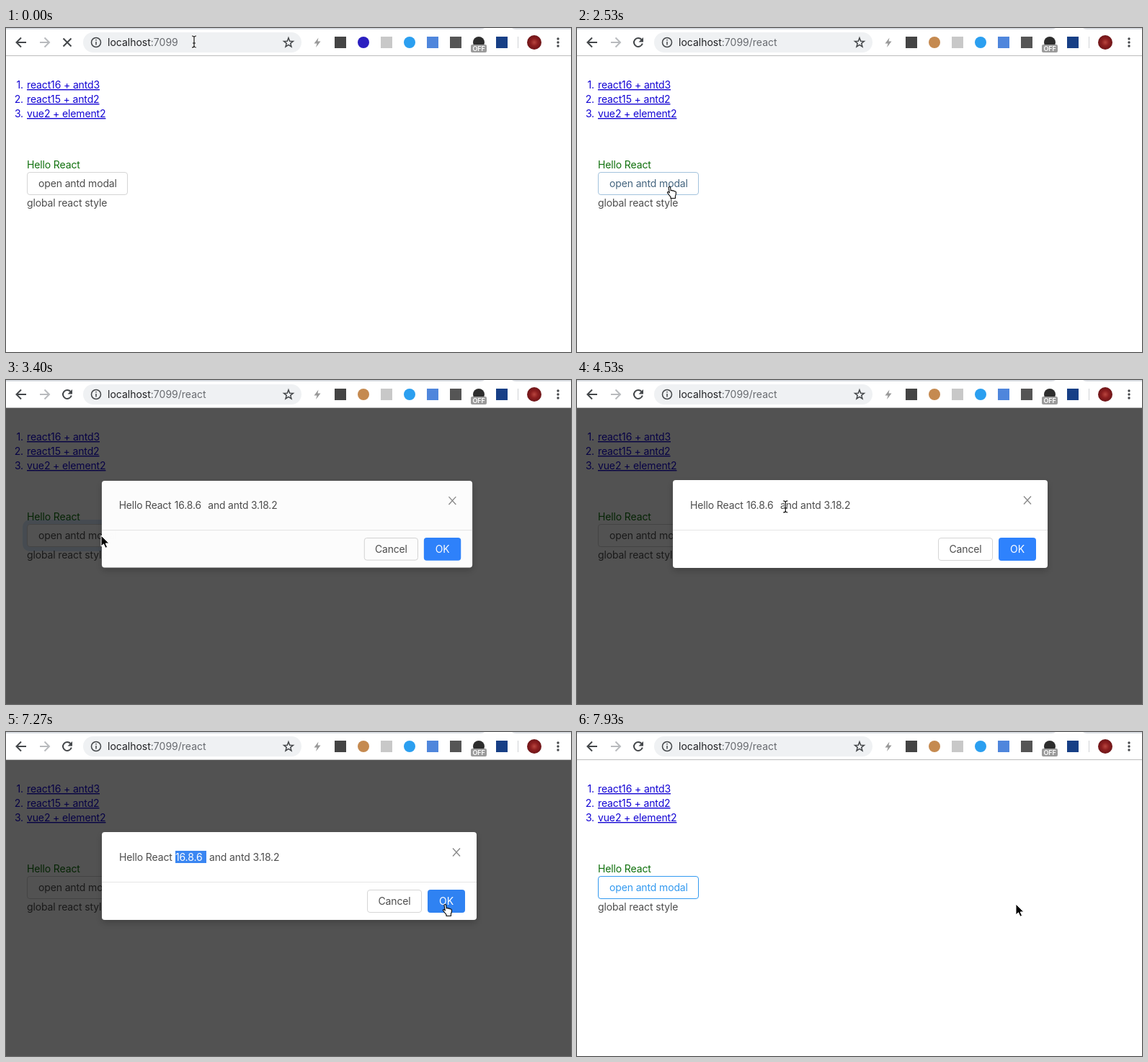
Write an HTML page that moves like this. It is 784 px wide and 450 px high and loops after 8000 ms.

```html
<!DOCTYPE html>
<html lang="en">
<head>
<meta charset="utf-8">
<title>Micro frontend demo</title>
<style>
  html, body { margin: 0; width: 100%; height: 100%; overflow: hidden; background: #fff; }
  svg { display: block; width: 100vw; height: 100vh; }
  text { font: 14px Inter, "Open Sans", sans-serif; letter-spacing: -.01em; fill: #4d4d4d; white-space: pre; }
  .url { letter-spacing: 0; }
  .links text { fill: #1405d4; }
  .links .link { text-decoration: underline; }
  .digits { font-variant-numeric: tabular-nums; }
  .line { fill: none; stroke: #44474a; stroke-width: 2; }
  .thin { stroke-width: 1.5; }
</style>
</head>
<body>
<svg viewBox="0 0 784 450">
  <defs>
    <radialGradient id="avatar">
      <stop offset="0" stop-color="#b8463f"/><stop offset=".5" stop-color="#8e1f20"/><stop offset="1" stop-color="#6d1518"/>
    </radialGradient>
    <filter id="shadow" x="-10%" y="-20%" width="120%" height="150%">
      <feDropShadow dx="0" dy="4" stdDeviation="5" flood-opacity=".2"/>
    </filter>
  </defs>
  <rect width="784" height="450" fill="#fff"/>

  <g id="page">
    <g class="links" id="links"></g>
    <text x="29" y="195" style="fill:#0f700c">Hello React</text>
    <rect id="wave" x="29" y="200" width="140" height="32" rx="4" fill="none" stroke="#3d96f5"/>
    <rect id="button" x="29.5" y="200.5" width="139" height="31" rx="3.5" fill="#fff"/>
    <text id="buttonText" x="45" y="221">open antd modal</text>
    <text x="29" y="248">global react style</text>
  </g>

  <rect id="mask" y="39" width="784" height="411"/>
  <g id="modal">
    <rect x="133" y="139" width="520" height="122" rx="4" fill="#fff" filter="url(#shadow)"/>
    <path d="M133 208.5H653" stroke="#e5e5e5"/>
    <path d="M620 161.500l10 11m0-11l-10 11" class="line" style="stroke:#888;stroke-width:1.3"/>
    <rect id="selection" y="165" height="17" fill="#3a86f2"/>
    <g class="digits">
      <text x="157" y="179">Hello React</text>
      <text x="235" y="179" id="version"></text>
      <text x="282" y="179">and antd 3.18.2</text>
    </g>
    <rect x="501.500" y="219.500" width="75" height="31" rx="3.5" fill="#fff" stroke="#d5d5d5"/>
    <text x="539" y="240" text-anchor="middle">Cancel</text>
    <rect id="ok" x="585" y="219" width="52" height="32" rx="4"/>
    <text x="611" y="240" text-anchor="middle" style="fill:#fff">OK</text>
  </g>

  <g id="toolbar">
    <rect width="784" height="39" fill="#fff"/>
    <path d="M0 0H664Q662 2 658 2H0ZM702 0H784V2H708Q704 2 702 0Z" fill="#d9dce2"/>
    <path d="M0 38.500H784" stroke="#bdbdbd"/>
    <path class="line" d="M28 20H15M21 13.500L14.500 20l6.500 6.500"/>
    <path class="line" style="stroke:#b9bbbe" d="M47 20H60M53.500 13.500L60 20l-6.500 6.500"/>
    <path id="stop" class="line" d="M79.500 14.500l11 11m0-11l-11 11"/>
    <g id="reload">
      <path class="line" d="M89.500 16A6 6 0 1 0 90.800 21.500"/>
      <path d="M92 13v6.500h-6.500Z" fill="#44474a"/>
    </g>
    <rect x="107" y="6" width="303" height="28" rx="14" fill="#eff1f3"/>
    <circle class="line thin" cx="125" cy="20" r="6.500"/>
    <path class="line thin" d="M125 19v4.500M125 16v1.600"/>
    <text class="url" x="141" y="25" style="fill:#202124">localhost<tspan id="path" fill="#686b70"></tspan></text>
    <path id="star" class="line thin"/>
    <path d="M433.500 13.500L427.500 21.500H431.500L430 27 436.500 18.500H432.500Z" fill="#999"/>
    <g id="extensions"></g>
    <rect x="645" y="23" width="22" height="11" rx="2" fill="#9b9b9b"/>
    <text x="656" y="32" text-anchor="middle" style="font-size:9px;font-weight:600;fill:#fff">OFF</text>
    <path d="M710.500 12V28" stroke="#d0d3d6"/>
    <circle cx="733" cy="20" r="10" fill="url(#avatar)"/>
    <path d="M766 15h.01M766 20h.01M766 25h.01" stroke="#44474a" stroke-width="3.400" stroke-linecap="round"/>
  </g>

  <g id="cursor">
    <path id="arrow" d="M0 0V15L3.500 11.800 6 17.300 8.600 16.200 6.200 10.900H11Z" fill="#000" stroke="#fff"/>
    <path id="hand" transform="translate(-3)" fill="#fff" stroke="#000" stroke-width="1.100" stroke-linejoin="round"
      d="M2 1.500C2 .2 4.400.2 4.600 1.500L5.200 6C5.800 5.200 7.300 5.300 7.600 6.300 8.400 5.600 9.800 5.900 10 7 11 6.500 12.300 7 12.400 8.300 12.600 10.500 12.300 12 11.400 13.600V16.500H5V14.600C3.500 13 2 11 .6 9 0 7.800 1.400 7 2.400 8L3.300 9Z"/>
    <g id="ibeam" fill="none">
      <path id="ibeamHalo" stroke="#fff" stroke-width="3"/>
      <path id="ibeamLine" stroke="#111" stroke-width="1.200"/>
    </g>
  </g>
</svg>

<script>
const LOOP = 8000;
const OPEN = 3160, CLOSE = 7330, CLOSED = 7530;
const ORIGIN = [130, 220];
const GREY = [77, 77, 77], BORDER = [213, 213, 213], HOVER = [51, 154, 240], ACTIVE = [15, 112, 214];
const $ = id => document.getElementById(id);
const set = (id, attrs) => Object.entries(attrs).forEach(([k, v]) => $(id).setAttribute(k, v));
const show = (id, visible) => set(id, { visibility: visible ? "visible" : "hidden" });
const clamp = v => Math.max(0, Math.min(1, v));
const lerp = (a, b, p) => a + (b - a) * p;
const smooth = p => p * p * (3 - 2 * p);
const mix = (a, b, p) => a.map((v, i) => lerp(v, b[i], p));
const rgb = c => `rgb(${c.map(Math.round)})`;
const inside = ([x, y], l, t, r, b) => x >= l && x <= r && y >= t && y <= b;

// Keys are [time, ...values]
function track(keys, t) {
  const next = keys.findIndex(k => k[0] > t);
  if (next === 0) return keys[0].slice(1);
  if (next < 0) return keys.at(-1).slice(1);
  const a = keys[next - 1], b = keys[next];
  return mix(a.slice(1), b.slice(1), smooth((t - a[0]) / (b[0] - a[0])));
}

function bezier(x1, y1, x2, y2) {
  const at = (a, b, u) => 3 * a * u * (1 - u) ** 2 + 3 * b * u * u * (1 - u) + u ** 3;
  return x => {
    let lo = 0, hi = 1;
    for (let i = 0; i < 24; i++) {
      const mid = (lo + hi) / 2;
      if (at(x1, x2, mid) < x) lo = mid; else hi = mid;
    }
    return at(y1, y2, hi);
  };
}
const easeOutCirc = bezier(.08, .82, .17, 1);
const easeInOutCirc = bezier(.78, .14, .15, .86);

const pointerKeys = [
  [700, 261, 19], [1300, 215, 110], [1800, 180, 150], [2330, 150, 192], [2480, 128, 220],
  [3100, 128, 220], [3200, 129, 218], [3400, 132, 216], [4100, 300, 178], [4950, 279, 174],
  [5200, 278, 174], [5800, 236, 174], [6000, 236, 174], [6650, 611, 246], [7000, 609, 239]
];
const hoverKeys = [[2420, 0], [2720, 1], [3200, 1], [3400, 0], [7350, 0], [7600, 1]];
const pressKeys = [[3080, 0], [3150, 1], [3400, 1], [3450, 0]];

function buildStatic() {
  $("links").innerHTML = ["react16 + antd3", "react15 + antd2", "vue2 + element2"].map((label, i) =>
    `<text x="24" y="${84 + i * 20}" text-anchor="end">${i + 1}.</text>
     <text class="link" x="29" y="${84 + i * 20}">${label}</text>`).join("");

  const square = (x, color) => `<rect x="${x - 8}" y="12" width="16" height="16" fill="${color}"/>`;
  const disc = (x, color, id = "") => `<circle id="${id}" cx="${x}" cy="20" r="8" fill="${color}"/>`;
  $("extensions").innerHTML = square(464, "#444") + disc(496, "#2b1fc0", "appIcon") + square(528, "#c8c8c8") +
    disc(560, "#2b9ff0") + square(592, "#4f86dc") + square(624, "#555") + disc(656, "#2d2d2d") + square(688, "#173f86");

  const points = Array.from({ length: 10 }, (_, i) => {
    const r = i % 2 ? 2.9 : 6.8, a = i * Math.PI / 5 - Math.PI / 2;
    return `${392 + r * Math.cos(a)} ${20.5 + r * Math.sin(a)}`;
  });
  set("star", { d: `M${points.join("L")}Z` });

  const beam = "M-3-8C-1-8 0-7 0-6V6C0 7-1 8-3 8M3-8C1-8 0-7 0-6M3 8C1 8 0 7 0 6M-2 2H2";
  set("ibeamHalo", { d: beam });
  set("ibeamLine", { d: beam });
}

function drawToolbar(t) {
  const routed = t >= 130, loaded = t >= 300;
  $("path").textContent = routed ? ":7099/react" : ":7099";
  set("appIcon", { fill: routed ? "#c58a50" : "#2b1fc0" });
  show("stop", !loaded);
  show("reload", loaded);
}

function drawButton(t) {
  const [hover] = track(hoverKeys, t), [press] = track(pressKeys, t);
  const accent = mix(HOVER, ACTIVE, press);
  set("button", { stroke: rgb(mix(BORDER, accent, hover)) });
  $("buttonText").style.fill = rgb(mix(GREY, accent, hover));
  const spread = clamp((t - 3130) / 400);
  set("wave", {
    "stroke-width": 12 * easeOutCirc(spread),
    opacity: spread > 0 ? .35 * (1 - clamp((t - 3130) / 600)) : 0
  });
}

function drawModal(t, pointer) {
  const closing = t >= CLOSE;
  const zoom = closing ? 1 - easeInOutCirc(clamp((t - CLOSE) / 200)) : easeOutCirc(clamp((t - OPEN) / 360));
  const fade = closing ? 1 - clamp((t - CLOSE) / 200) : clamp((t - OPEN) / 200);
  const scale = lerp(.2, 1, zoom), [ox, oy] = ORIGIN;
  const visible = t >= OPEN && t < CLOSED;
  set("mask", { opacity: visible ? .68 * fade : 0 });
  set("modal", {
    opacity: visible ? zoom : 0,
    transform: `translate(${ox} ${oy}) scale(${scale}) translate(${-ox} ${-oy})`
  });
  set("ok", { fill: inside(pointer, 585, 219, 637, 251) ? "#2f82f2" : "#2e82fd" });

  const version = "16.8.6";
  const edges = [235, 243, 252, 256, 265, 269, 278];
  let start = version.length;
  if (t >= 5840) start = 0;
  else if (t >= 5200) start = Math.max(1, edges.findIndex(x => x >= pointer[0] - 3));
  set("selection", { x: edges[start], width: 278 - edges[start] });
  $("version").innerHTML = `${version.slice(0, start)}<tspan fill="#fff">${version.slice(start)}</tspan>`;
}

function cursorKind(t, p) {
  if (p[1] < 39) return "ibeam";
  if (t < OPEN) return inside(p, 29, 200, 169, 232) ? "hand" : "arrow";
  if (t >= CLOSE) return "arrow";
  if (inside(p, 157, 163, 386, 185)) return "ibeam";
  return inside(p, 585, 219, 637, 251) ? "hand" : "arrow";
}

function frame() {
  const t = performance.now() % LOOP;
  const pointer = track(pointerKeys, t);
  drawToolbar(t);
  drawButton(t);
  drawModal(t, pointer);
  set("cursor", { transform: `translate(${pointer})` });
  const kind = cursorKind(t, pointer);
  ["arrow", "hand", "ibeam"].forEach(id => show(id, id === kind));
  requestAnimationFrame(frame);
}

buildStatic();
frame();
</script>
</body>
</html>
```
